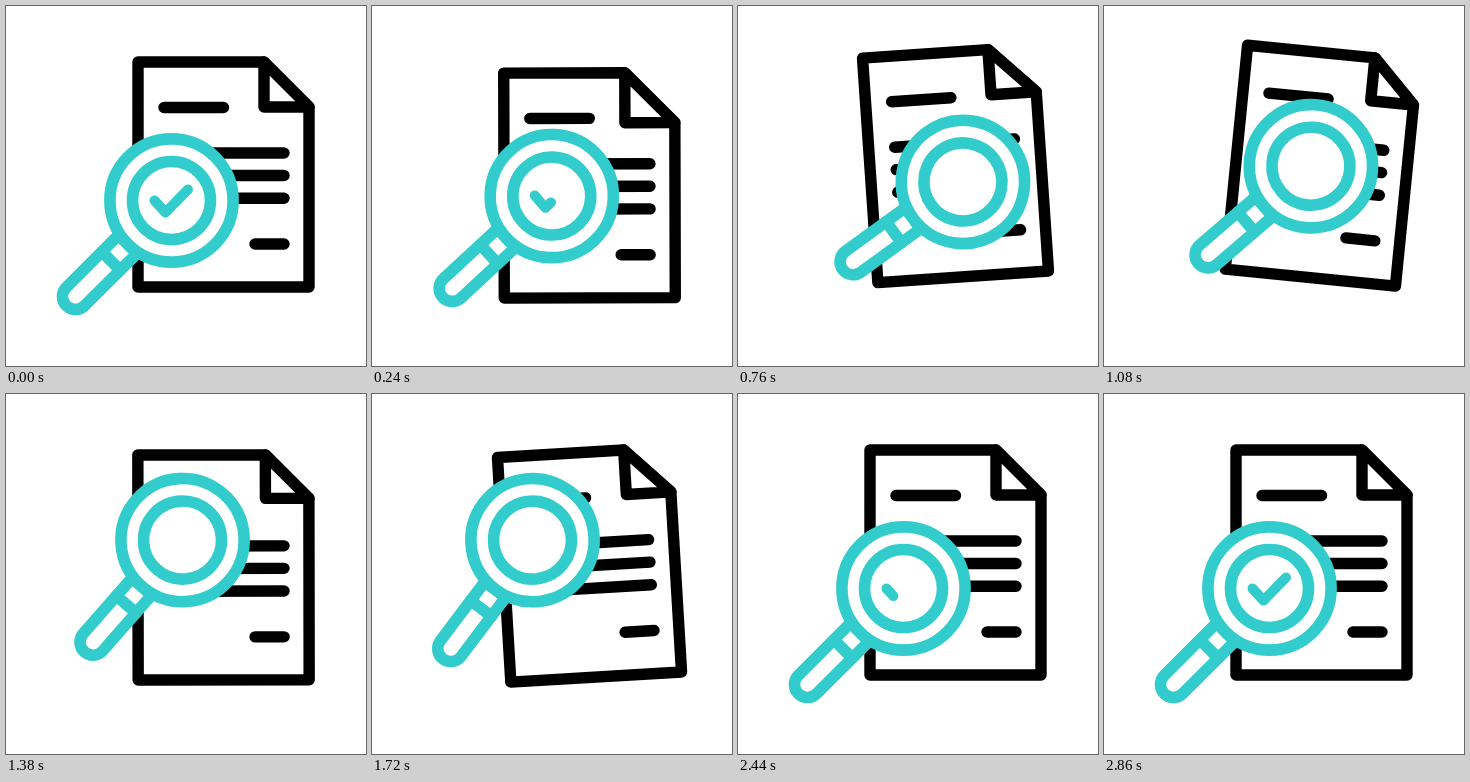
An HTML page that plays this animation: 360x360 px, repeating every 3340 ms.

```html
<!DOCTYPE html>
<html lang="en">
<head>
<meta charset="utf-8">
<title>Document review</title>
<style>
  html, body { margin: 0; width: 100%; height: 100%; overflow: hidden; background: #fff; }
  svg { display: block; width: 100%; height: 100%; }
  g { stroke-linecap: round; stroke-linejoin: round; fill: #fff; }
  #page { stroke: #000; stroke-width: 11.4; }
  #lens { stroke: #33cccc; stroke-width: 11.6; }
  #check { fill: none; stroke-width: 10; }
</style>
</head>
<body>
<svg viewBox="0 0 360 360">
  <g id="page">
    <path id="sheet"/>
    <path id="fold"/>
    <path d="M-59.5-67H0M-59.5-21.5H60.5M-59.5 1H60.5M-59.5 23.7H60.5M31.5 69.5H60.5"/>
  </g>
  <g id="lens">
    <g transform="rotate(135)">
      <path d="M62-13H135.8A13 13 0 0 1 135.8 13H62Z"/>
      <path d="M85.5-13V13"/>
    </g>
    <circle r="61.6"/>
    <circle r="39"/>
    <path id="check" d="M-17 0L-6 12L16.5-11" pathLength="100"/>
  </g>
</svg>
<script>
(() => {
  const LOOP = 3340;
  const [page, sheet, fold, lens, check] =
    ["page", "sheet", "fold", "lens", "check"].map(id => document.getElementById(id));

  const clamp = v => Math.min(1, Math.max(0, v));
  const ease = p => (1 - Math.cos(Math.PI * clamp(p))) / 2;

  // Builds a function of time from a start value and eased moves [from ms, to ms, value].
  const glide = (value, ...moves) => t => {
    let v = value;
    for (const [from, to, next] of moves) v += (next - v) * ease((t - from) / (to - from));
    return v;
  };

  const pageY = glide(168.5, [0, 400, 185], [400, 890, 153.5], [890, 1400, 173.5], [1400, 2000, 168.5]);
  const pageTurn = glide(0, [200, 620, -6.2], [620, 1110, 5.8], [1110, 1600, -4.3], [1600, 2000, 0]);
  const foldSize = glide(45, [0, 260, 50], [260, 1080, 43], [1080, 2000, 45]);

  const lensX = glide(165.5, [0, 740, 225], [740, 1700, 160.5], [1700, 2340, 165.5]);
  const lensY = glide(194.5, [0, 740, 176], [740, 1400, 146], [1700, 2340, 194.5]);
  const lensTurn = glide(0, [0, 740, 9], [740, 1700, -8], [1700, 2340, 0]);

  const checkShown = t => t < 1000 ? 1 - clamp(t / 480) : clamp((t - 2340) / 480);

  function draw(t) {
    const size = foldSize(t), x = 85.5 - size, y = size - 112.5;
    sheet.setAttribute("d", `M-85.5-112.5H${x}L85.5 ${y}V112.5H-85.5Z`);
    fold.setAttribute("d", `M${x}-112.5V${y}H85.5Z`);
    page.setAttribute("transform", `translate(217.5 ${pageY(t)}) rotate(${pageTurn(t)})`);
    lens.setAttribute("transform", `translate(${lensX(t)} ${lensY(t)}) rotate(${lensTurn(t)})`);

    const shown = checkShown(t);
    check.setAttribute("visibility", shown > 0 ? "visible" : "hidden");
    check.setAttribute("stroke-dasharray", `${shown * 100} 200`);
  }

  const start = performance.now();
  function tick() {
    draw((performance.now() - start) % LOOP);
    requestAnimationFrame(tick);
  }
  tick();
})();
</script>
</body>
</html>
```
